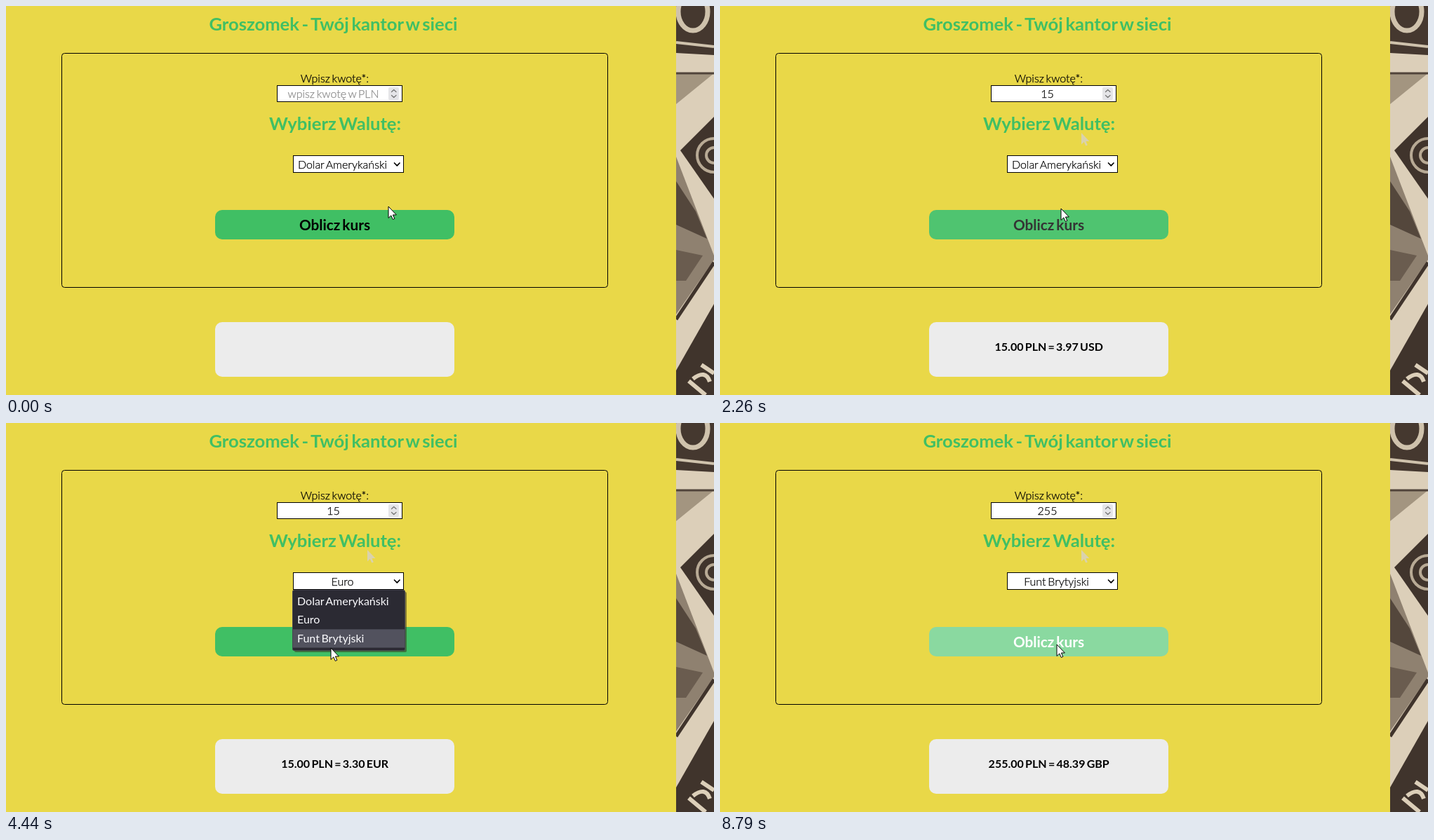
These frames come from a looping animation (1009 px wide and 555 px high, 9480 ms). An HTML page:

```html
<!DOCTYPE html>
<html lang="pl">
<head>
<meta charset="utf-8">
<title>Kantor</title>
<style>
html, body { margin: 0; width: 100%; height: 100%; overflow: hidden; background: #e9d848; }
svg { display: block; }
text { font: 16px Lato, "Open Sans", sans-serif; word-spacing: -.1em; text-anchor: middle; white-space: pre; }
.head { font-size: 25.6px; font-weight: 700; fill: #40bf64; }
.thin { font-weight: 300; fill: currentColor; stroke: currentColor; stroke-width: .25; }
.bold { font-weight: 700; }
.box { fill: #fff; stroke: #000; }
.line { fill: none; stroke-linecap: round; stroke-linejoin: round; }
#menu text { fill: #fbfbfe; text-anchor: start; }
</style>
</head>
<body>
<svg width="1009" height="555" viewBox="0 0 1009 555">
  <rect width="1009" height="555" fill="#e9d848"/>

  <!-- banknote strip -->
  <svg x="955" width="54" height="555" viewBox="0 0 54 555">
    <rect width="54" height="555" fill="#dccfb9"/>
    <path d="M0 0H54V70L0 67Z" fill="#45382f"/>
    <g fill="none" stroke="#cfc2ac">
      <ellipse cx="24" cy="8" rx="21" ry="27" stroke-width="7"/>
      <path d="M0 52L54 58" stroke-width="4"/>
    </g>
    <path d="M0 96H54L0 140Z" fill="#a39580"/>
    <path d="M0 96H54" stroke="#51443a" stroke-width="3"/>
    <path d="M6 206L54 158V275Z" fill="#40342c"/>
    <g fill="none" stroke="#b8aa95" stroke-width="4">
      <circle cx="54" cy="213" r="24"/>
      <circle cx="54" cy="213" r="11"/>
    </g>
    <path d="M0 215L54 356V362L0 440Z" fill="#8f8170"/>
    <path d="M0 250L28 293L44 332L0 312Z" fill="#54473c"/>
    <path d="M0 348L38 356L14 392H0Z" fill="#6a5c4f"/>
    <path d="M0 447L54 366" stroke="#40342c" stroke-width="5"/>
    <path d="M0 520L54 425V555H0Z" fill="#40342c"/>
    <path d="M18 535L42 555M24 532Q42 518 48 536M36 512L54 524" fill="none" stroke="#dccfb9" stroke-width="6"/>
  </svg>

  <text class="head" x="643.5" y="35" style="text-anchor:end">Groszomek - Twój kantor w sieci</text>
  <rect x="79.5" y="67.5" width="778" height="334" rx="4" fill="none" stroke="#000"/>

  <text class="thin" x="468.5" y="109">Wpisz kwotę*:</text>
  <rect id="ring" x="385" y="112" width="181" height="26" rx="1" fill="none" stroke="#0060df" stroke-width="3"/>
  <rect class="box" x="386.5" y="113.5" width="178" height="23"/>
  <rect x="545" y="116" width="15" height="18" rx="2" fill="#e5e5e8"/>
  <path class="line" d="M549.5 122.5L552.7 119.5L556 122.5M549.5 127.5L552.7 130.5L556 127.5" stroke="#777" stroke-width="1.3"/>
  <rect id="mark" x="458" y="116" width="17.5" height="18.5" fill="#0078d7"/>
  <text id="amount" class="thin" x="466.5" y="131"></text>

  <text class="head" x="469" y="177">Wybierz Walutę:</text>
  <path id="trace" fill="#dad2ac" transform="translate(515 181)"/>

  <rect class="box" x="409.5" y="213.5" width="157" height="24"/>
  <text id="chosen" class="thin" x="479.5" y="231.5"></text>
  <path class="line" d="M553.5 224L557.3 227.8L561 224" stroke="#000" stroke-width="1.7"/>

  <rect id="button" x="298" y="291" width="341" height="42" rx="10"/>
  <text id="buttonText" class="bold" x="468.5" y="320" style="font-size:20.8px">Oblicz kurs</text>

  <rect x="298" y="451" width="341" height="78" rx="10" fill="#ececec"/>
  <text id="result" class="bold" x="468.7" y="491.5"></text>

  <g id="menu">
    <rect x="411" y="241" width="160" height="86" rx="2" fill="#3a3620" opacity=".55"/>
    <rect x="408.5" y="238.5" width="160" height="86" rx="2" fill="#2b2a33" stroke="#45444f"/>
    <rect id="hot" x="409" width="159" height="26.3" fill="#52525e"/>
  </g>

  <circle id="press" r="12" fill="#e6e41c" opacity=".8"/>
  <path id="arrow" fill="#fff" stroke="#000" stroke-linejoin="round"/>
  <path id="beam" class="line" d="M-3 -7.5H-1L0 -6.5L1 -7.5H3M0 -6.5V6.5M-3 7.5H-1L0 6.5L1 7.5H3" stroke="#222" stroke-width="1.1"/>
</svg>

<script>
const LOOP = 9480, TRAVEL = 220, FADE = 650;
const TYPE_DELAY = 250, KEY_GAP = 120, PRESS = 100;
const MENU_TOP = 241.7, ROW = 26.3;
const ARROW = "M0 0V16.5L3.8 12.9L6.3 18.5L8.8 17.4L6.4 12H11.4Z";

const CURRENCIES = [
  { name: "Dolar Amerykański", code: "USD", rate: 3.78 },
  { name: "Euro", code: "EUR", rate: 4.55 },
  { name: "Funt Brytyjski", code: "GBP", rate: 5.27 }
];

// The visitor's session: when the pointer sets off, when it clicks, where, and on what.
const stop = (leave, click, x, y, on, text) => ({ leave, click, x, y, on, text });
const STOPS = [
  stop(0, LOOP, 545, 286),
  stop(130, 560, 492, 128, "field", "15"),
  stop(970, 1210, 484, 224, "select"),
  stop(1320, 1650, 452, 262, "option"),
  stop(1800, 2140, 488, 318, "button"),
  stop(2180, 2600, 480, 224, "select"),
  stop(2630, 3145, 467, 278, "option"),
  stop(3160, 3400, 478, 312, "button"),
  stop(3440, 4100, 480, 221, "select"),
  stop(4110, 4620, 463, 321, "option"),
  stop(5150, 5340, 488, 323, "button"),
  stop(6230, 6980, 422, 141, "field", "255"),
  stop(7850, 8130, 480, 316, "button")
];

const el = id => document.getElementById(id);
const show = (id, on) => el(id).setAttribute("visibility", on ? "visible" : "hidden");
const move = (id, x, y) => el(id).setAttribute("transform", `translate(${x} ${y})`);
const clamp = (v, max = 1) => Math.min(max, Math.max(0, v));
const ease = p => p * p * (3 - 2 * p);
const lerp = (a, b, k) => a + (b - a) * k;
const mix = (a, b, k) => `rgb(${a.map((v, i) => Math.round(lerp(v, b[i], k)))})`;
const rowAt = y => clamp(Math.floor((y - MENU_TOP) / ROW), 2);

function pointerAt(t) {
  const i = STOPS.filter(s => s.leave <= t).length - 1;
  const to = STOPS[i], from = STOPS[Math.max(0, i - 1)];
  const k = ease(clamp((t - to.leave) / TRAVEL));
  return [lerp(from.x, to.x, k), lerp(from.y, to.y, k)].map(Math.round);
}

// The button lights up while the pointer rests on it and fades once it leaves.
function hoverAt(t) {
  const levels = STOPS.map((s, i) => {
    if (s.on !== "button") return 0;
    const enter = s.leave + TRAVEL / 2;
    const exit = i + 1 < STOPS.length ? STOPS[i + 1].leave : LOOP;
    const peak = clamp((Math.min(t, exit) - enter) / FADE);
    return clamp(peak - Math.max(0, t - exit) / FADE);
  });
  return ease(Math.max(...levels));
}

function stateAt(t) {
  const state = { amount: "", choice: 0, result: "", on: "", marked: false, pressed: false };
  for (const s of STOPS.filter(s => s.click <= t)) {
    const since = t - s.click;
    state.on = s.on;
    state.pressed = since < PRESS;
    if (s.on === "field") {
      const keys = Math.floor((since - TYPE_DELAY) / KEY_GAP) + 1;
      state.marked = state.amount !== "" && keys < 1;
      if (keys > 0) state.amount = s.text.slice(0, keys);
    } else if (s.on === "option") {
      state.choice = rowAt(s.y);
    } else if (s.on === "button") {
      const { code, rate } = CURRENCIES[state.choice];
      const sum = Number(state.amount);
      state.result = `${sum.toFixed(2)} PLN = ${(sum / rate).toFixed(2)} ${code}`;
    }
  }
  return state;
}

function draw(t) {
  const [x, y] = pointerAt(t);
  const state = stateAt(t);
  const hover = hoverAt(t);
  const overText = y < 180;

  el("amount").textContent = state.amount || "wpisz kwotę w PLN";
  el("amount").style.color = state.marked ? "#fff" : state.amount ? "#000" : "#888";
  el("chosen").textContent = CURRENCIES[state.choice].name;
  el("result").textContent = state.result;
  el("button").setAttribute("fill", mix([64, 191, 100], [138, 217, 160], hover));
  el("buttonText").setAttribute("fill", mix([0, 0, 0], [255, 255, 255], hover));
  el("hot").setAttribute("y", MENU_TOP + ROW * (y < MENU_TOP ? state.choice : rowAt(y)));

  show("ring", state.on === "field");
  show("mark", state.marked);
  show("menu", state.on === "select");
  show("trace", t > STOPS[1].leave + TRAVEL);
  show("press", state.pressed);
  show("arrow", !overText);
  show("beam", overText);
  move("press", x - 1, y);
  move("arrow", x, y);
  move("beam", x, y);
}

CURRENCIES.forEach(({ name }, i) => {
  const label = document.createElementNS("http://www.w3.org/2000/svg", "text");
  label.setAttribute("x", 415);
  label.setAttribute("y", MENU_TOP + ROW * i + 18.3);
  label.textContent = name;
  el("menu").append(label);
});
for (const id of ["arrow", "trace"]) el(id).setAttribute("d", ARROW);

const start = performance.now();
function tick() {
  draw((performance.now() - start) % LOOP);
  requestAnimationFrame(tick);
}
tick();
</script>
</body>
</html>
```
